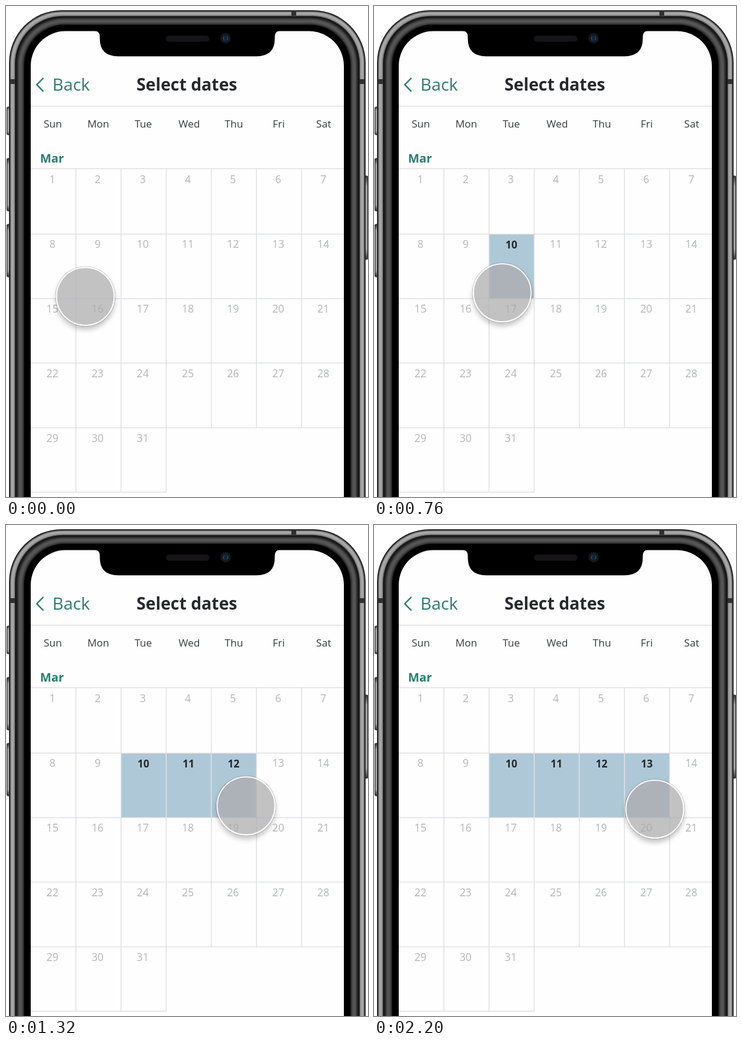
An HTML page for the animation above (2240 ms loop, 600x812 px).

```html
<!DOCTYPE html>
<html lang="en">
<head>
<meta charset="utf-8">
<title>Select dates</title>
<style>
  html, body { margin: 0; width: 100%; height: 100%; overflow: hidden; background: #fff; }
  svg { position: absolute; left: 0; top: 0; display: block; }
  text { font-family: "Open Sans", sans-serif; }
  .title { font-size: 27.8px; font-weight: 700; fill: #26292d; }
  .back { font-size: 28.2px; fill: #2a7d71; }
  .month { font-size: 19.7px; font-weight: 700; fill: #2a7d71; }
  .weekday { font-size: 17px; fill: #36393c; }
  .day { font-size: 17.3px; fill: #b3b5b8; }
  .fill { fill: #aec8d7; visibility: hidden; }
  .picked .fill { visibility: visible; }
  .picked .day { font-size: 17px; font-weight: 700; fill: #22282d; transform: translate(1px, .4px); }
  .middle { text-anchor: middle; }
  #touch {
    position: absolute; left: -49px; top: -49px; width: 98px; height: 98px;
    box-sizing: border-box; border-radius: 50%;
    border: 2px solid #fbfbfb; background: rgba(171, 170, 171, .7); background-clip: padding-box;
    box-shadow: 0 0 1px 0.5px rgba(0, 0, 0, .38), 0 6px 9px rgba(0, 0, 0, .23);
  }
</style>
</head>
<body>
<svg width="600" height="812" viewBox="0 0 600 812">
  <defs>
    <linearGradient id="button" x2="0" y2="1">
      <stop offset="0" stop-color="#333"/><stop offset=".12" stop-color="#aaa"/>
      <stop offset=".88" stop-color="#aaa"/><stop offset="1" stop-color="#333"/>
    </linearGradient>
  </defs>
  <g fill="url(#button)" stroke="#2a2a2a" stroke-width="1.200">
    <rect x="1.600" y="167" width="7" height="46" rx="2"/>
    <rect x="1.600" y="252" width="7" height="87" rx="2"/>
    <rect x="1.600" y="361" width="7" height="87" rx="2"/>
    <rect x="592" y="281" width="7.500" height="138" rx="2"/>
  </g>
  <g id="body"></g>
  <g fill="#303030">
    <rect x="473" y="8" width="8" height="8"/>
    <rect x="6" y="121" width="9" height="8"/>
    <rect x="586" y="121" width="9" height="8"/>
  </g>
  <path d="M41 812V99A57.500 57.500 0 0 1 98.500 41.500H502.500A57.500 57.500 0 0 1 560 99V812Z" fill="#fefefe"/>
  <path d="M147 41Q155.500 41.500 155.500 51V54Q155.500 83.200 186 83.200H415Q445.500 83.200 445.500 54V51Q445.500 41.500 454 41Z"/>
  <rect x="265" y="49" width="72" height="10" rx="5" fill="#161418"/>
  <circle cx="364" cy="53.500" r="8.500" fill="#15181e"/>
  <circle cx="364" cy="53.500" r="5" fill="#10263c"/>
  <path d="M362 50.500a3.500 3.500 0 0 0 0 6M366 50.500a3.500 3.500 0 0 1 0 6" fill="none" stroke="#2f628c"/>
  <path d="M62 119L51 130.200L62 141.500" fill="none" stroke="#2a7d71" stroke-width="2.400"/>
  <text class="back" x="77" y="140">Back</text>
  <text class="title middle" x="299.700" y="140">Select dates</text>
  <text class="month" x="56.500" y="259">Mar</text>
  <g id="days"></g>
  <path id="grid" fill="none" stroke="#e0e1e5" stroke-width="1.500"/>
</svg>
<div id="touch"></div>
<script>
const LEFT = 41, COLUMN = 74.83, ROWS = [269, 377.2, 484, 590.6, 697.4, 804];
const LOOP = 2240, STEP = 40;
const $ = id => document.getElementById(id);

function add(parent, tag, attrs, content = "") {
  const node = document.createElementNS("http://www.w3.org/2000/svg", tag);
  for (const key in attrs) node.setAttribute(key, attrs[key]);
  node.textContent = content;
  return parent.appendChild(node);
}

// Phone rim: nested rounded outlines from the edge inwards.
[[0, "#242424"], [2, "#777"], [3.5, "#a8a8a8"], [7, "#969696"], [9, "#606060"],
 [10, "#181818"], [13, "#2c2c2c"], [15, "#484848"], [17, "#555"], [21, "#464646"],
 [23, "#2b2b2b"], [25, "#000"]].forEach(([inset, fill]) => add($("body"), "rect", {
  x: 5 + inset, y: 7 + inset * .97, width: 591 - 2 * inset, height: 900, rx: 87 - inset * .8, fill
}));

const weekdays = { Sun: 77.5, Mon: 153, Tue: 227.5, Wed: 303.7, Thu: 377.7, Fri: 452, Sat: 526.5 };
for (const name in weekdays)
  add($("days"), "text", { class: "weekday middle", x: weekdays[name], y: 201 }, name);

const cells = {};
for (let day = 1; day <= 31; day++) {
  const column = (day - 1) % 7, row = Math.floor((day - 1) / 7);
  const cell = cells[day] = add($("days"), "g", {});
  add(cell, "rect", { class: "fill", x: LEFT + COLUMN * column, y: ROWS[row],
    width: COLUMN, height: ROWS[row + 1] - ROWS[row] });
  add(cell, "text", { class: "day middle", x: 77 + COLUMN * column, y: 293.4 + 106.8 * row }, day);
}

let lines = "M41 165.800H560";
ROWS.forEach((y, i) => lines += `M${LEFT} ${y}H${i === 5 ? LEFT + 3 * COLUMN : 560}`);
for (let i = 1; i < 7; i++)
  lines += `M${LEFT + COLUMN * i} ${ROWS[0]}V${ROWS[i < 4 ? 5 : 4]}`;
$("grid").setAttribute("d", lines);

// Touch path as [time, x, y].
const path = [[0, 131.5, 480.2], [240, 138, 481.3], [410, 138, 481.3], [600, 171, 481.2],
  [960, 275.5, 464.7], [1160, 348.5, 464.5], [1520, 439.5, 464.8], [1920, 459.5, 466.7],
  [2080, 460.8, 467], [2120, 460.8, 467], [2200, 465.5, 469.9]];

const slope = (i, axis) => (path[i + 1][axis] - path[i][axis]) / (path[i + 1][0] - path[i][0]);

function tangent(i, axis) {
  if (i === 0 || i === path.length - 1) return slope(Math.max(i - 1, 0), axis);
  const a = slope(i - 1, axis), b = slope(i, axis);
  return a * b > 0 ? 2 * a * b / (a + b) : 0;
}

// Monotone cubic interpolation: smooth speed without overshoot.
function along(t, axis) {
  let i = 0;
  while (i < path.length - 2 && t >= path[i + 1][0]) i++;
  const span = path[i + 1][0] - path[i][0], u = (t - path[i][0]) / span, v = 1 - u;
  return path[i][axis] * (1 + 2 * u) * v * v + path[i + 1][axis] * u * u * (3 - 2 * u)
    + span * u * v * (tangent(i, axis) * v - tangent(i + 1, axis) * u);
}

const start = performance.now();

function draw(now) {
  const elapsed = Math.max(0, now - start) % LOOP;
  const t = Math.floor(elapsed / STEP) * STEP;
  const x = along(t, 1), y = along(t, 2);
  $("touch").style.transform = `translate(${x}px, ${y}px)`;
  for (let day = 10; day <= 13; day++)
    cells[day].classList.toggle("picked", x > LEFT + COLUMN * (day - 8) + 14);
  requestAnimationFrame(draw);
}
draw(start);
</script>
</body>
</html>
```
